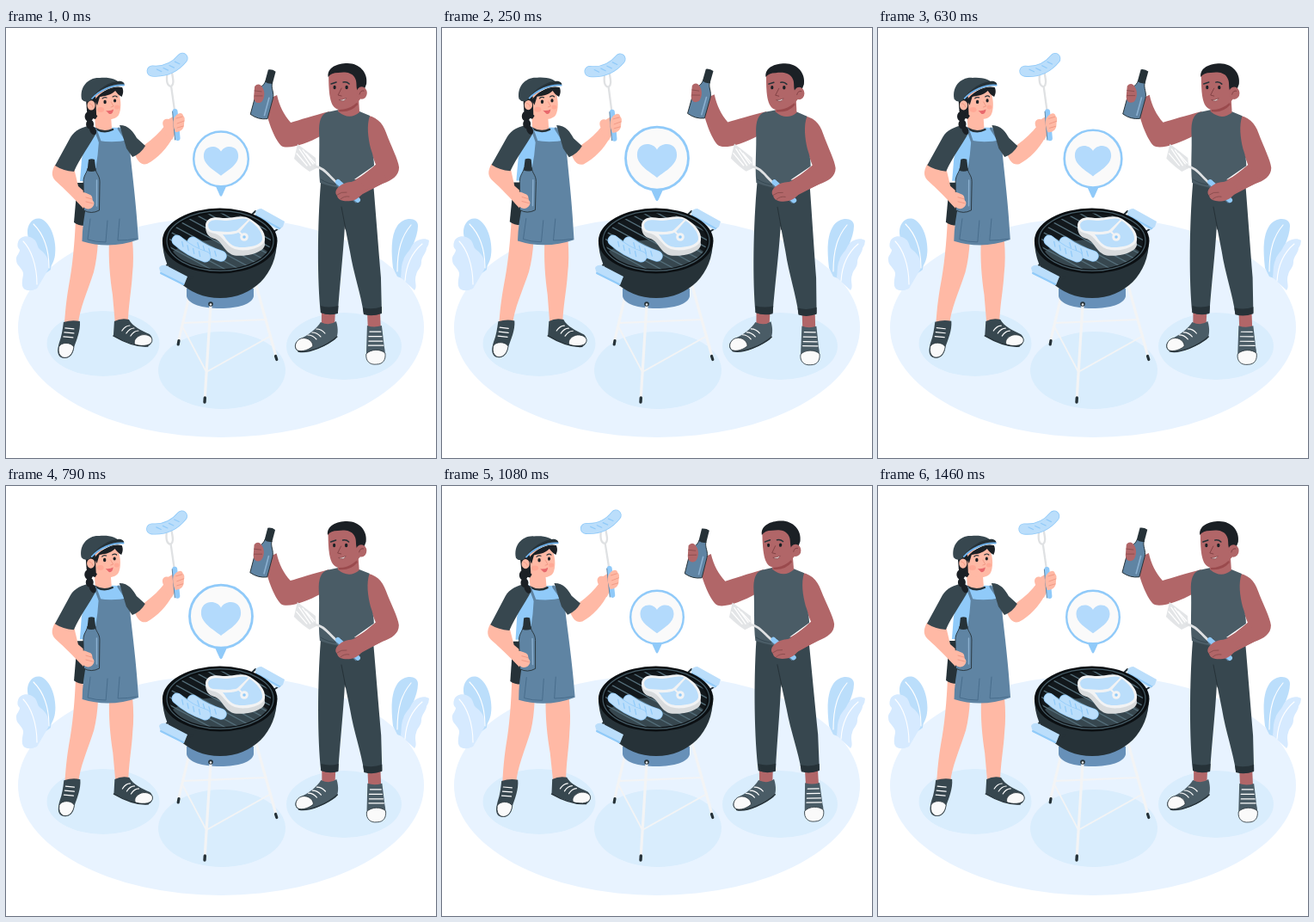
An HTML page for the animation above (1.5 s loop, 500 by 500 pixels).

```html
<!DOCTYPE html>
<html lang="en">
<head>
<meta charset="utf-8">
<title>Barbecue</title>
<style>
html, body { margin: 0; width: 100%; height: 100%; overflow: hidden; background: #fff; }
svg { display: block; width: 100vw; height: 100vh; }
.line { fill: none; stroke-linecap: round; stroke-linejoin: round; }
.floor { fill: #e8f3ff; } .shade { fill: #d9edfd; }
.pale { fill: #d6eaff; } .sky { fill: #bbdefb; } .blue { fill: #90caf9; }
.steel { fill: #5f84a3; } .slate { fill: #37474f; } .ink { fill: #263238; }
.vest { fill: #4a5c66; } .hair { fill: #1b2025; }
.peach { fill: #ffb9a5; } .brown { fill: #b16668; } .white { fill: #fafafa; }
.wire { stroke: #f3f4f5; } .vein { stroke: #fff; stroke-width: 1.1; }
.dark { stroke: #263238; }
.lace { stroke: #fff; stroke-width: 1.2; }
.toe { fill: #fafafa; stroke: #263238; stroke-width: .8; }
</style>
</head>
<body>
<svg viewBox="0 0 500 500">
  <defs>
    <clipPath id="pan"><ellipse cx="249" cy="248" rx="59" ry="32.5"/></clipPath>
  </defs>

  <ellipse class="floor" cx="250" cy="348" rx="236" ry="128"/>
  <ellipse class="shade" cx="113" cy="367" rx="65.5" ry="38"/>
  <ellipse class="shade" cx="251" cy="398" rx="74" ry="45"/>
  <ellipse class="shade" cx="393" cy="370" rx="67" ry="39"/>

  <g id="plants">
    <path class="sky" d="M25 239C24 226 34 218 43 223C54 230 59 250 57 264C56 273 52 275 52 281L38 291C39 268 27 258 25 239Z"/>
    <path class="pale" d="M14 249C16 241 27 240 33 246C37 250 36 255 40 258C48 264 51 271 49 281L36 303Q28 307 22 304C17 301 19 293 20 287C21 280 12 277 12 270C11 265 16 262 16 258Q12 254 14 249Z"/>
    <path class="line vein" d="M32 228C44 240 50 258 50 279M20 248C29 257 36 276 36 298"/>
    <path class="sky" d="M450 279C448 262 447 242 455 230C463 219 479 220 479 230C479 245 468 260 466 274L463 292L455 289Z"/>
    <path class="pale" d="M492 247C486 243 475 246 471 255C469 260 464 263 462 270C459 277 460 284 459 290L475 305C479 301 474 294 477 287C478 281 483 279 483 272C483 266 489 261 489 256Q492 252 492 247Z"/>
    <path class="line vein" d="M471 229C460 242 455 258 455 283M484 251C471 262 465 278 464 294"/>
  </g>

  <g id="grill">
    <path class="line wire" stroke-width="1.8" d="M206 343L302 339M205 347L233 400L308 358"/>
    <path class="line wire" stroke-width="3.2" d="M213 312L201 362M291 300L313.5 380"/>
    <path class="line dark" stroke-width="3.2" d="M201 363.5L200.2 368M313.5 381.5L314.8 385.5"/>
    <path fill="#6790b8" d="M210 303H288V312C286 321 270 326 249 326S212 321 210 312Z"/>
    <path class="line wire" stroke-width="3.2" d="M238 322L231.3 429"/>
    <path class="line dark" stroke-width="3.4" d="M231.3 430L231 435"/>
    <circle class="ink" cx="238" cy="321" r="2.8"/><circle class="white" cx="238" cy="321.5" r="1.2"/>
    <path class="line dark" stroke-width="2" d="M185 278L191 272M290 213L284 219M319 232L311 237"/>
    <path class="sky" d="M290 214Q292 210 297 210L324 225L322 231L317 235L290 219Z"/>
    <path class="line" stroke="#90caf9" stroke-width="2" d="M291 218L318 233"/>
    <path class="ink" d="M182 247C182 286 211 314 249 314S315 286 315 247Z"/>
    <ellipse cx="248.7" cy="247.5" rx="66.8" ry="38" fill="#0b0f12"/>
    <ellipse cx="249" cy="247.5" rx="62" ry="34.8" fill="none" stroke="#455a64" stroke-width="1.2"/>
    <g clip-path="url(#pan)">
      <rect x="185" y="210" width="130" height="80" fill="#12181c"/>
      <ellipse class="slate" cx="249" cy="272" rx="62" ry="26"/>
      <g id="bars" class="line" stroke="#546e7a" stroke-width="1.3"></g>
    </g>
    <path class="line dark" stroke-width="2" d="M208 294L218 289"/>
    <path class="sky" d="M178 279Q180 275 186 276L211 289L207 299L180 286Z"/>
    <path class="line" stroke="#90caf9" stroke-width="2" d="M180 285L206 298"/>

    <path fill="#d8dbdd" d="M232 231C232 238 235 243 242 245C251 247 253 260 264 264C276 267 300 262 301 252L300 240Z"/>
    <path fill="#f2f3f4" d="M232 229C233 220 243 219 252 221C262 222 274 216 284 222C294 228 302 237 301 246C300 256 278 261 266 257C255 253 253 242 243 239C236 238 232 235 232 229Z"/>
    <path class="sky" d="M235 229C236 222 246 223 254 224C264 225 274 219 282 223L268 236C257 238 247 236 241 236Q235 235 235 229Z"/>
    <path class="sky" d="M283 224C291 229 299 238 298 246C296 253 283 255 274 255C260 255 257 246 252 240Q264 241 272 237Z"/>
    <path class="line" stroke="#f2f3f4" stroke-width="2" d="M252 238Q264 239 270 236L283 223M270 236L277 243"/>
    <circle cx="277" cy="243" r="4.8" fill="#f2f3f4"/><circle class="blue" cx="277" cy="243" r="1.8"/>
    <g id="cooked"></g>
  </g>

  <g id="bubble">
    <path class="blue" d="M243.5 182H256.5L251.5 193Q250 196 248.5 193Z"/>
    <circle class="white" cx="250" cy="152.5" r="30.8" stroke="#90caf9" stroke-width="2.4"/>
    <path fill="#b3dafc" d="M250 144C246 136 230.5 136 230.5 149C230.5 159 242 165 250 171.3C258 165 269.5 159 269.5 149C269.5 136 254 136 250 144Z"/>
  </g>

  <g id="woman">
    <path class="peach" d="M81 222C80 250 77 280 73 300C70 318 69 330 68 345H84C85 328 95 306 102 284Q106 268 107 248Z"/>
    <path class="peach" d="M120 246C119 270 121 290 124 310L127 344H142C142 325 146 305 147 286Q149 268 147 246Z"/>
    <path class="ink" d="M83 180L79 226Q84 230 92 230L100 180Z"/>
    <path class="slate" d="M67 342Q77 339 86 341C87 352 82 363 79 372C78 382 71 386 64 383C59 380 60 373 62 366C65 358 66 350 67 342Z"/>
    <path class="toe" d="M61.5 371C64 365 76 365 79 371C78 379 73 385 66 383Q60 380 61.5 371Z"/>
    <path class="line lace" d="M69 349L79 350M68 354L79 355M67 359L78 360"/>
    <path class="slate" d="M126 341Q134 337 143 339C147 347 158 352 167 356C172 360 171 368 165 370C153 371 138 365 125 358Z"/>
    <path class="toe" d="M155 358C160 355 169 357 170 362C171 369 160 371 150 368C148 364 151 360 155 358Z"/>
    <path class="line dark" stroke-width="1.4" d="M125 358C137 365 152 371 165 370"/>
    <path class="line lace" d="M135 352Q139 346 144 346M140 355Q144 349 149 349M145 358Q149 352 154 352"/>

    <path class="blue" d="M98 115L135 116L142 133L147 178H86L88 152Z"/>
    <path class="peach" d="M103 101L122 103L123 117Q113 123 104 117Z"/>
    <path class="line dark" stroke-width="2.4" d="M104 117Q114 123 124 118"/>
    <path class="steel" d="M108 131Q125 134 143 130C145 158 151 195 154 246Q121 258 88.500 248C89 218 97 190 104 165Q107 148 108 131Z"/>
    <path class="line" stroke="#5f84a3" stroke-width="3" d="M109 132L104 118M141 132L131 117"/>
    <path class="line" stroke="#466a89" stroke-width=".9" d="M98 222L95 246Q104 249 116 249L118 224M132 222L130 247Q142 247 152 245"/>

    <path class="peach" d="M150 147C153 155 157 160 164 158C176 152 188 139 194 127L185 113C179 121 171 129 161 136Z"/>
    <path class="slate" d="M132 113C143 113 148 121 152 128L162 137Q157 146 147 150L140 140Z"/>
    <path class="peach" d="M57 159C52 168 53 174 59 179C68 187 79 198 90 210L99 197L84 184L79 163Z"/>
    <path class="slate" d="M100 113C88 115 80 119 75 127L57 160Q66 166 79 167C86 151 97 137 105 122Z"/>

    <g id="beer">
      <path class="steel dark" stroke-width=".9" d="M95 163L104 163C104 169 109 171 109 179L108.500 212Q99 217 90.500 212L90 179C90 171 94 169 95 163Z"/>
      <path class="ink" d="M96 153Q99.500 151.500 103 153L104.500 166Q99 168 94.500 166Z"/>
      <path class="line" stroke="#8bb0d0" stroke-width="1.4" d="M105.500 177V207"/>
    </g>
    <path class="peach" d="M83 193C89 189 93 192 98 194C102 197 99 199 102 202C104 207 98 212 93 210Q86 207 82 200Z"/>
    <path class="line" stroke="#ed937f" stroke-width=".8" d="M93 197L100 199M93 202L101 204"/>

    <path class="peach" d="M184 116C180 110 183 104 189 106L194 103L200 103L202 120L197 122L193 130Q184 126 184 116Z"/>
    <path class="line" stroke="#dfe1e3" stroke-width="2.3" d="M196 96L192 68M187.500 51C186 62 187 67 192 68C196 65 194 59 192.500 50"/>
    <path class="line" stroke="#90caf9" stroke-width="6" d="M196.500 97L199.500 128"/>
    <path class="line" stroke="#5f84a3" stroke-width="1" d="M193.500 97L196.500 130"/>
    <path class="peach" d="M195 105C199 98 205 97 206 102C209 105 207 108 207 112C207 119 201 121 197 121Q193 112 195 105Z"/>
    <path class="line" stroke="#ed937f" stroke-width=".8" d="M198 105L205 103M199 111L207 108M199 116L206 114"/>
    <g id="forked"></g>

    <path class="hair" d="M93 84L108 78L109 98L104 106Q96 105 94 97Z"/>
    <g class="hair"><ellipse cx="96.5" cy="103" rx="5" ry="6"/><ellipse cx="97.500" cy="112" rx="4.5" ry="5.5"/><ellipse cx="101" cy="119" rx="3.6" ry="5.5" transform="rotate(-25 101 119)"/></g>
    <path class="peach" d="M104 78C113 72 127 70 131 76C134 84 134 95 131 101C127 108 111 108 105 101Z"/>
    <ellipse class="peach" cx="99" cy="90" rx="4.6" ry="5.6"/>
    <path class="line" stroke="#ed937f" stroke-width=".8" d="M97 88Q100 88 101 92M122 86L125 91L122 92"/>
    <g fill="#ff9c8b" opacity=".55"><ellipse cx="110" cy="95" rx="4" ry="3"/><ellipse cx="129" cy="92" rx="3" ry="2.5"/></g>
    <path class="hair" d="M103 84C108 75 124 66 135 69C137 73 136 77 134.500 80C131 78 129 76 127 73C121 79 114 79 109 80L106 90Z"/>
    <g class="hair"><ellipse cx="115" cy="86" rx="1.7" ry="2.2"/><ellipse cx="126.500" cy="84.500" rx="1.6" ry="2.1"/></g>
    <path class="line dark" stroke-width="1.2" d="M112 82Q114 80 117 81M124 80Q127 78 129 80"/>
    <path fill="#e8686c" d="M116 96Q121 97 125 94.500Q124 101 120 100Z"/>
    <path class="slate" d="M88 83C85 68 96 57 109 58C121 57 129 60 132 64C120 66 108 73 97 85Q91 87 88 83Z"/>
    <path class="ink" d="M98 83C107 70 124 60 134 62Q139 64 137 67C123 67 111 73 101 81Z"/>
    <path class="line" stroke="#6fb3ee" stroke-width="1.8" d="M100 82C108 73 124 65 137 66.500"/>
  </g>

  <g id="man">
    <path class="brown" d="M367 328H383L382 350H367ZM420 328H435L436 352H421Z"/>
    <path class="vest" d="M366 342Q376 347 384 341C387 350 386 359 383 362C372 370 352 379 340 376C334 373 335 366 341 362C352 357 361 350 366 342Z"/>
    <path class="toe" d="M341 362C348 358 357 363 357 370C350 376 341 377 338 374C335 370 337 365 341 362Z"/>
    <path class="line dark" stroke-width="1.4" d="M385 359C374 369 352 379 340 376"/>
    <path class="line lace" d="M361 350Q367 350 371 355M356 354Q362 354 366 359M351 357Q357 357 361 362"/>
    <path class="vest" d="M420 346Q428 349 437 346L440 371C442 380 441 388 435 390C426 393 419 389 419 381Z"/>
    <path class="toe" d="M419 379C424 373 436 373 441 378C442 385 439 391 431 391C423 392 418 387 419 379Z"/>
    <path class="line lace" d="M423 353H436M422 358.500H437M422 364H438M421.500 369H439"/>
    <path class="slate" d="M366 180H427C430 215 433 255 436 290L437 331Q426 336 416 332C413 310 404 285 400 260L394 230C392 265 388 300 386 331Q375 334 366 331C362 295 362 230 366 180Z"/>
    <path class="ink" d="M366 323Q376 326 386.500 323L386 332Q375 335 366 331ZM415 325Q426 328 437 324V332Q426 336 416 333Z"/>
    <path class="line dark" stroke-width="1" d="M390 208L395 234"/>

    <path class="brown" d="M376 97C357 102 341 107 331 110C323 101 318 91 315 78L300 85C303 106 312 129 320 137C327 142 349 135 367 125Z"/>
    <path class="brown" d="M416 101C430 102 438 110 442 122C448 138 456 153 457 162C457 172 449 177 438 181L413 193L399 179C412 175 421 166 430 159L419 130Z"/>
    <path class="vest" d="M373 98L387 95Q398 106 411 97L423 102C419 113 421 128 424 140C427 148 428 154 428 160L405 176L428 184Q397 192 365 180C363 160 365 140 364 122Q363 102 373 98Z"/>
    <path class="line" stroke="#344650" stroke-width=".9" d="M366 176Q375 182 386 182M372 170Q380 178 390 178"/>
    <path class="brown" d="M399 180C412 176 421 167 430 159L445 177L413 194Z"/>
    <path class="brown" d="M387 85L410 82L411 98Q399 108 386 97Z"/>
    <path fill="#9a4a4d" d="M388 93Q400 93 407 84L409 89Q400 99 387 97Z"/>
    <path class="brown" d="M375 53C384 46 402 47 412 57L416 77C410 87 400 95 388 95C377 94 375 80 375 53Z"/>
    <path class="hair" d="M374.500 57C373 46 385 41 397 41C411 41 421 52 419 65L416 73L409 74C406 68 409 63 405 57C401 51 393 51 386 52Q378 52 374.500 57Z"/>
    <ellipse class="brown" cx="413.500" cy="75.500" rx="6.200" ry="7.200"/>
    <path class="line" stroke="#7e3f42" stroke-width=".9" d="M411 77Q412 72 416 73M390 70L386 78L390 79"/>
    <path class="white" stroke="#7e3f42" stroke-width=".7" d="M387 83.500Q391 84 395.500 81.500Q393 87 387 83.500Z"/>
    <g class="hair"><ellipse cx="382" cy="69" rx="1.6" ry="2.2"/><ellipse cx="396" cy="69" rx="1.7" ry="2.2"/></g>
    <path class="line dark" stroke-width="1.5" d="M378 65L384 63M392 63Q396 62 399 65"/>

    <g transform="rotate(15 301 78)">
      <path class="steel dark" stroke-width=".9" d="M297.500 62H305.500C305.500 69 311 72 311 80V104Q301 108 290.500 104V80C291 72 297 69 297.500 62Z"/>
      <path class="ink" d="M297 48.500Q301.500 46.500 306 48.500L306 63Q301 65 297 63Z"/>
      <path class="line" stroke="#8bb0d0" stroke-width="1.6" d="M306.500 80V101"/>
    </g>
    <path class="brown" d="M289 68C292 64 296 65 298 69C302 75 300 83 297 86C292 89 288 86 288 80Z"/>
    <path class="line" stroke="#84494a" stroke-width=".8" d="M289 73L297 74M289 79L298 79"/>

    <g id="spatula">
      <path fill="#e3e5e7" d="M339 135L360 151L361 163L353 167Q345 162 335 152Z"/>
      <path class="line" stroke="#fff" stroke-width="1.3" d="M338 146L350 160M341 141L354 160M345 142L357 158M349 146L359 157"/>
      <path class="line" stroke="#dfe1e3" stroke-width="2.8" d="M359 161C370 162 375 172 386 181"/>
      <path class="line" stroke="#90caf9" stroke-width="6" d="M386 179L409 200"/>
      <path class="line" stroke="#5f84a3" stroke-width="1" d="M384 182L407 203"/>
    </g>
    <path class="brown" d="M413 179C403 178 394 179 389 183C383 187 382 192 385 195C386 201 394 202 401 201C409 200 414 194 418 188Z"/>
    <path class="line" stroke="#84494a" stroke-width=".8" d="M385 194Q390 190 396 191M389 199Q393 195 399 196"/>
  </g>
</svg>
<script>
const LOOP = 1500, FPS = 24, LEAD = 16;
const el = id => document.getElementById(id);

// One sausage: a bent round stroke with a rim and short grill marks.
function sausage(x, y, len, angle, bend) {
  const curve = `M0 0Q${len / 2} ${bend} ${len} 0`;
  const stroke = (color, width) =>
    `<path class="line" d="${curve}" stroke="${color}" stroke-width="${width}"/>`;
  let marks = "";
  for (let i = 1; i <= 4; i++) {
    const u = i / 5, mx = len * u, my = 2 * u * (1 - u) * bend;
    marks += `M${mx - 2} ${my - 3}L${mx + 2} ${my + 1.5}`;
  }
  return `<g transform="translate(${x} ${y}) rotate(${angle})">` +
    stroke("#90caf9", 13) + stroke("#bbdefb", 11.4) +
    `<path class="line" d="${marks}" stroke="#90caf9" stroke-width="1.2"/></g>`;
}

el("cooked").innerHTML = sausage(217, 249, 37, 26, 3) + sausage(199, 247, 38, 30, 4);
el("forked").innerHTML = sausage(170, 50, 38, -23, 10);

let bars = "";
for (let y = 150; y < 290; y += 9) bars += `M180 ${y}l140 76`;
el("bars").innerHTML = `<path d="${bars}"/>`;

// Linear interpolation through [position, value] stops.
function track(stops, p) {
  const i = stops.findIndex(s => s[0] > p);
  const [a, from] = stops[i - 1], [b, to] = stops[i];
  return from + (to - from) * (p - a) / (b - a);
}

const sway = [[0, 0], [.25, 1], [.75, -1], [1, 0]];
const beat = [[0, 1], [.1, 1.3], [.3, 1], [.4, 1], [.5, 1.3], [.6, 1], [1, 1]];

function draw(ms) {
  const step = Math.floor((ms + 5) * FPS / 1000);
  const p = ((step * 1000 / FPS + LEAD) % LOOP) / LOOP;
  const angle = track(sway, p);
  el("woman").setAttribute("transform", `rotate(${angle} 133 206)`);
  el("man").setAttribute("transform", `rotate(${angle} 371 216)`);
  el("bubble").setAttribute("transform",
    `translate(250 157.3) scale(${track(beat, p)}) translate(-250 -157.3)`);
}

const start = performance.now();
function tick() {
  draw(performance.now() - start);
  requestAnimationFrame(tick);
}
tick();
</script>
</body>
</html>
```
